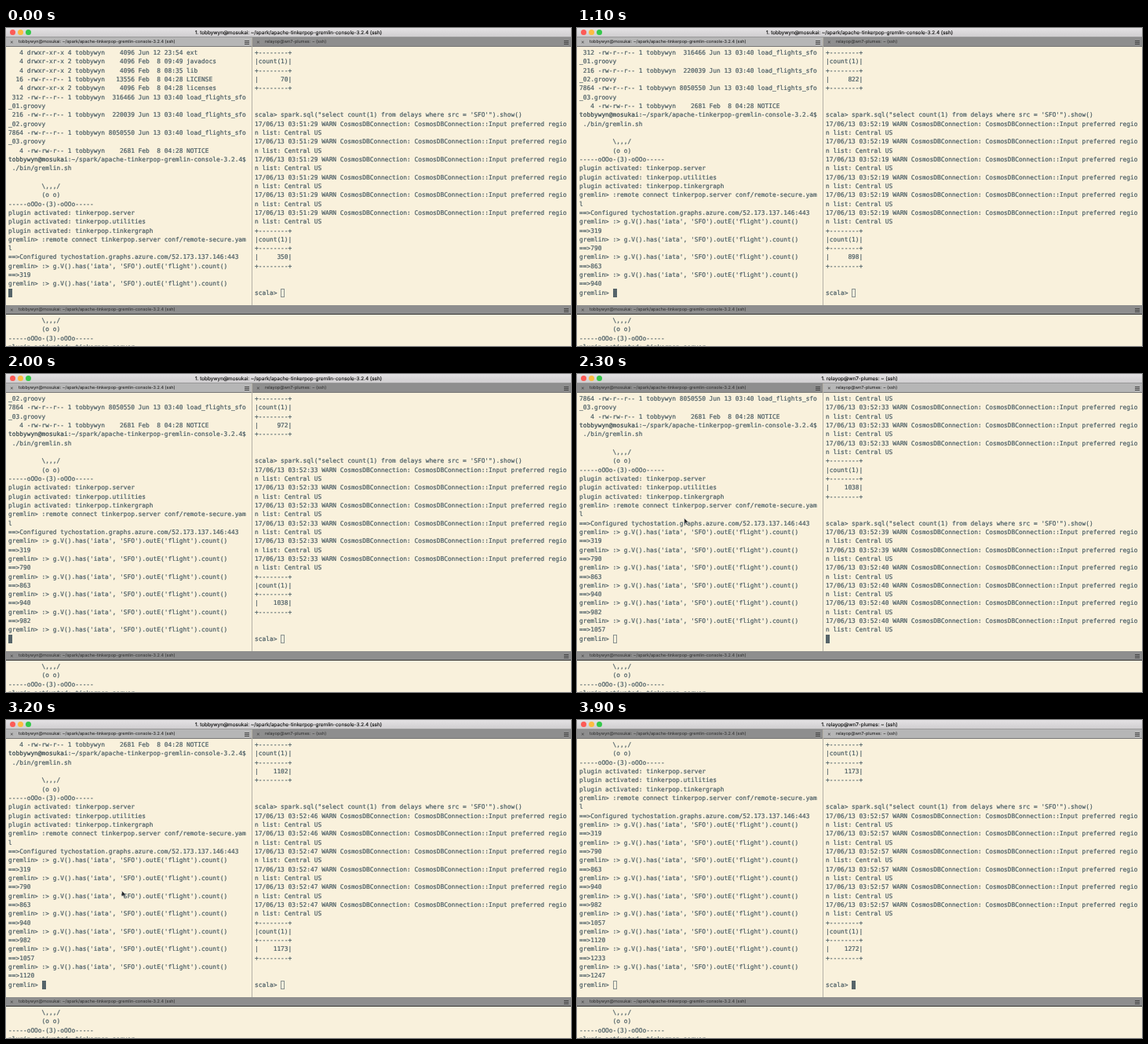
An HTML page for the animation above (4000 ms loop, 720 by 405 pixels).

```html
<!DOCTYPE html>
<html lang="en">
<head>
<meta charset="utf-8">
<title>Terminal</title>
<style>
  html, body { margin: 0; width: 100%; height: 100%; overflow: hidden; background: #f9f1dc; }
  #stage {
    position: relative; width: 720px; height: 405px; overflow: hidden;
    background: #f9f1dc; text-rendering: geometricPrecision;
  }
  #stage div, #stage i { position: absolute; box-sizing: border-box; }
  #title {
    left: 0; top: 0; width: 720px; height: 12px; padding-top: 1px;
    background: linear-gradient(#e4e2e4, #d0ced0); border-bottom: 1px solid #999;
    font: 6.4px/10px Inter, sans-serif; color: #111; text-align: center; white-space: pre;
    -webkit-text-stroke: .15px;
  }
  #title i { top: 2.4px; width: 7px; height: 7px; border-radius: 50%; }
  .tab {
    height: 12px; background: #8e8e8e; border-bottom: 1px solid #777;
    font: 5.5px/12px Inter, sans-serif; color: #2a2a2a; white-space: pre;
  }
  .tab.on { background: #b6b6b6; color: #111; }
  .tab.low { border-color: #333; }
  .tab div { left: 16px; top: 0; }
  .tab .x { left: 5px; font-size: 7px; color: #444; }
  .tab i {
    right: 3px; top: 4px; width: 6px; height: 4.6px;
    background: repeating-linear-gradient(#444 0 .8px, transparent .8px 1.9px);
  }
  .pane { overflow: hidden; }
  .row {
    left: 3px; height: 11.33px; white-space: pre; color: #4d5f66;
    font: 7.875px/11.33px "DejaVu Sans Mono", monospace;
    -webkit-text-stroke: .22px;
  }
  .row span { color: #34464d; }
  .cursor { width: 5px; height: 11.4px; border: 1px solid #87908f; }
  .cursor.on { background: #566469; border-color: #566469; }
  #split { left: 313px; top: 12px; width: 1px; height: 341px; background: #b5b1a6; }
  #mouse { position: absolute; left: 0; top: 0; }
</style>
</head>
<body>
<div id="stage">
  <div id="title"><span></span></div>
  <div id="split"></div>
  <svg id="mouse" width="8" height="11" viewBox="0 0 8 11">
    <path d="M.6.6V8L2.3 6.5 3.6 9.3 4.9 8.7 3.6 6 6 5.8Z" fill="#222" stroke="#fff" stroke-width=".5"/>
  </svg>
</div>
<script>
const LOOP = 4000, ROWS = 28, PITCH = 11.33, CHAR = 4.741;
const USER = 'tobbywyn', HOST = USER + '@mosukai', DIR = '~/spark/apache-tinkerpop-gremlin-console-3.2.4';
const TITLES = [`${HOST}: ${DIR} (ssh)`, 'relayop@wn7-plumes: ~ (ssh)'];
const QUERY = "gremlin> :> g.V().has('iata', 'SFO').outE('flight').count()";
const SQL = `scala> spark.sql("select count(1) from delays where src = 'SFO'").show()`;

const stage = document.getElementById('stage');
const title = document.getElementById('title');
const mouse = document.getElementById('mouse');

function add(parent, cls, style = {}, text = '', tag = 'div') {
  const el = document.createElement(tag);
  el.className = cls;
  el.textContent = text;
  for (const k in style) el.style[k] = typeof style[k] === 'number' ? style[k] + 'px' : style[k];
  return parent.appendChild(el);
}

['#fc5b57', '#fdbc40', '#34c84a'].forEach((background, i) =>
  add(title, '', { left: 4.5 + i * 10.4, background }, '', 'i'));

function makeTab(left, top, width, text, cls = '') {
  const tab = add(stage, 'tab ' + cls, { left, top, width });
  add(tab, 'x', {}, '×');
  add(tab, '', {}, text);
  add(tab, '', {}, '', 'i');
  return tab;
}

function makePane(left, top, width, height, rows) {
  const box = add(stage, 'pane', { left, top, width, height });
  return { box, rows: Array.from({ length: rows }, (_, i) => add(box, 'row', { top: 1.9 + i * PITCH })) };
}

function setRow(row, text) {
  row.textContent = text;
  if (!text.startsWith(HOST)) return;
  row.textContent = '';
  add(row, '', {}, HOST, 'span');
  row.append(text.slice(HOST.length));
}

const tabs = [makeTab(0, 12, 313, TITLES[0]), makeTab(314, 12, 406, TITLES[1])];
makeTab(0, 353, 720, TITLES[0], 'low');
const panes = [makePane(0, 24, 313, 329, ROWS), makePane(314, 24, 406, 329, ROWS)];
panes.forEach(p => p.cursor = add(p.box, 'cursor', { top: 1.9 + (ROWS - 1) * PITCH }));

// Terminal text
const file = (blocks, mode, links, size, date, name) =>
  `${String(blocks).padStart(4)} ${mode} ${links} ${USER} ${String(size).padStart(7)} ${date} ${name}`;
const DIRMODE = 'drwxr-xr-x', RW = '-rw-r--r--';
const loader = (blocks, size, n) =>
  [file(blocks, RW, 1, size, 'Jun 13 03:40', 'load_flights_sfo'), `_0${n}.groovy`];
const banner = [
  ' '.repeat(9) + '\\,,,/', ' '.repeat(9) + '(o o)', '-----oOOo-(3)-oOOo-----',
  ...['server', 'utilities', 'tinkergraph'].map(s => 'plugin activated: tinkerpop.' + s)
];
const rule = '+--------+';
const table = n => [rule, '|count(1)|', rule, `|${String(n).padStart(8)}|`, rule, '', ''];
const warnings = (min, sec, first) => Array.from({ length: 6 }, (_, i) => [
  `17/06/13 03:${min}:${sec + (i >= first)} WARN CosmosDBConnection: CosmosDBConnection::Input preferred regio`,
  'n list: Central US'
]).flat();

const left = [
  file(4, DIRMODE, 4, 4096, 'Jun 12 23:54', 'ext'),
  file(4, DIRMODE, 2, 4096, 'Feb  8 09:49', 'javadocs'),
  file(4, DIRMODE, 2, 4096, 'Feb  8 08:35', 'lib'),
  file(16, RW, 1, 13556, 'Feb  8 04:28', 'LICENSE'),
  file(4, DIRMODE, 2, 4096, 'Feb  8 04:28', 'licenses'),
  ...loader(312, 316466, 1), ...loader(216, 220039, 2), ...loader(7864, 8050550, 3),
  file(4, '-rw-rw-r--', 1, 2681, 'Feb  8 04:28', 'NOTICE'),
  `${HOST}:${DIR}$`, ' ./bin/gremlin.sh', '',
  ...banner,
  'gremlin> :remote connect tinkerpop.server conf/remote-secure.yam', 'l',
  '==>Configured tychostation.graphs.azure.com/52.173.137.146:443',
  QUERY, '==>319', QUERY, ''
];
const right = [...table(70), SQL, ...warnings(51, 29, 6), ...table(350), 'scala> '];

makePane(0, 365, 720, 40, 4).rows.forEach((row, i) => setRow(row, banner[i]));

// Each state replaces the last line of one log with new lines
const states = [];
const save = (t, focus) => states.push({ t, focus, logs: [left.slice(-ROWS), right.slice(-ROWS)] });
function put(t, side, ...lines) {
  const log = side ? right : left;
  log.pop();
  log.push(...lines);
  save(t, side);
}
const answer = (t, n) => put(t, 0, '==>' + n, 'gremlin> ');
function count(t, n) {
  put(t, 0, QUERY, '');
  answer(t + 100, n);
}
function spark(t, n, sec, first = 6) {
  put(t, 1, SQL);
  put(t + 100, 1, SQL, ...warnings(52, sec, first), '');
  put(t + 200, 1, ...table(n), 'scala> ');
}

save(0, 0);
answer(100, 790);
spark(200, 822, 11, 5);
count(500, 863);
spark(700, 898, 19);
count(1000, 940);
spark(1200, 972, 26);
count(1500, 982);
spark(1700, 1038, 33);
count(2000, 1057);
spark(2200, 1102, 39, 2);
count(2500, 1120);
spark(2700, 1173, 46, 2);
save(3000, 0);
count(3300, 1233);
count(3500, 1247);
spark(3700, 1272, 57);

// Pointer: time, x, y; no position means hidden
const pointer = [
  [0], [600, 297, 193], [700, 345, 198], [800], [1600, 257, 182], [1700, 345, 192], [1800],
  [2300, 136, 183], [2400], [3200, 147, 217], [3300]
];

let shown;
function draw(state) {
  if (state === shown) return;
  shown = state;
  title.firstChild.textContent = '1. ' + TITLES[state.focus];
  panes.forEach((pane, i) => {
    const log = state.logs[i];
    pane.rows.forEach((row, r) => setRow(row, log[r]));
    pane.cursor.style.left = 3 + log[ROWS - 1].length * CHAR + 'px';
    pane.cursor.classList.toggle('on', i === state.focus);
    tabs[i].classList.toggle('on', i === state.focus);
  });
}

function tick() {
  const t = performance.now() % LOOP;
  draw(states.findLast(s => s.t <= t));
  const [, x, y] = pointer.findLast(p => p[0] <= t);
  mouse.style.visibility = x ? 'visible' : 'hidden';
  if (x) mouse.style.transform = `translate(${x}px, ${y}px)`;
  requestAnimationFrame(tick);
}
tick();
</script>
</body>
</html>
```
